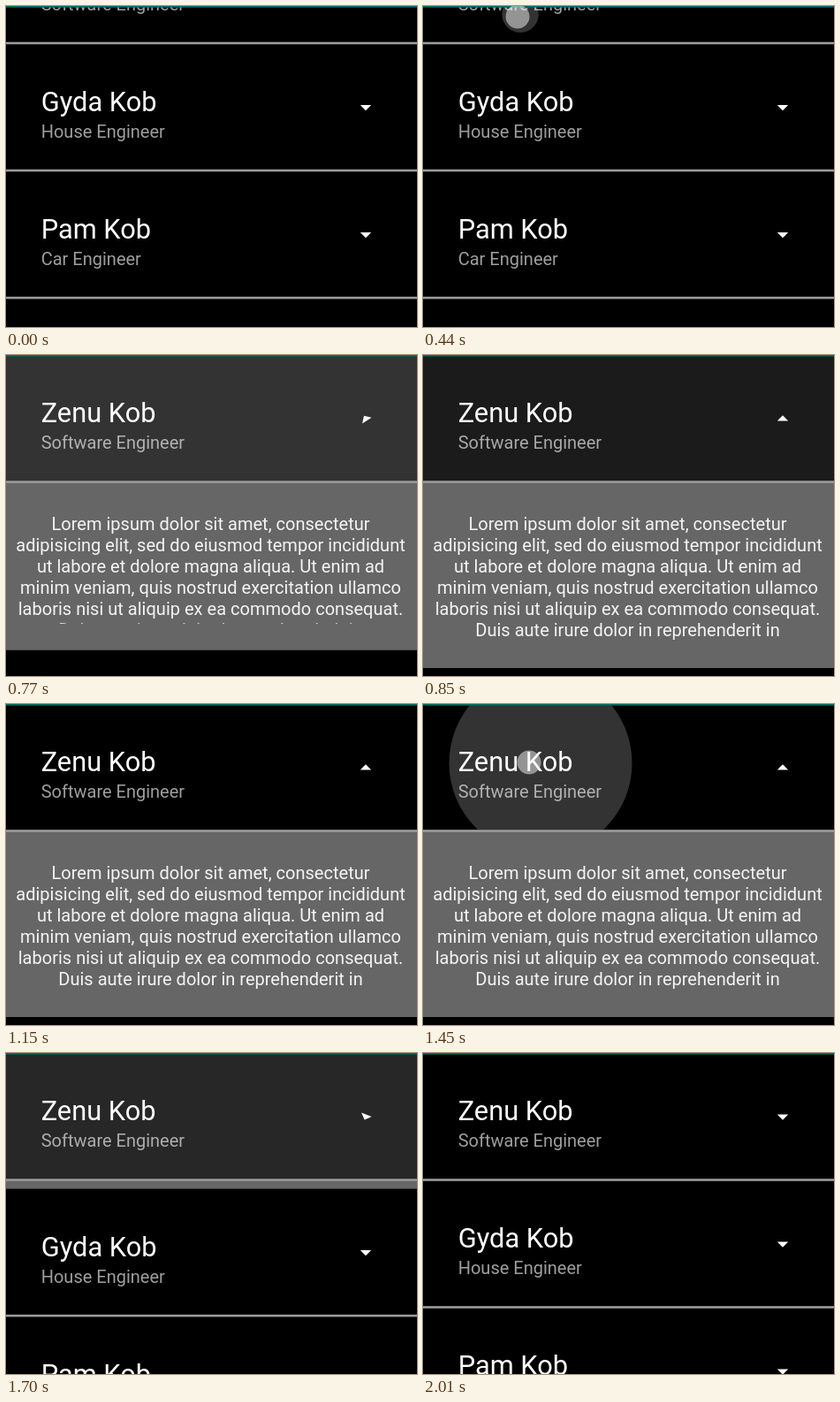
An HTML page with a canvas that plays this animation: 465 px wide and 363 px high, repeating every 2.16 s.

```html
<!DOCTYPE html>
<html lang="en">
<head>
<meta charset="utf-8">
<title>Expandable list</title>
<style>
  html, body { margin: 0; width: 100%; height: 100%; overflow: hidden; background: #000; }
  canvas { display: block; }
</style>
</head>
<body>
<canvas id="stage" width="465" height="363"></canvas>
<script>
const ctx = document.getElementById('stage').getContext('2d');
const WIDTH = 465, HEIGHT = 363, LOOP = 2160;
const ROW = 144, PANEL = 210, START_SCROLL = 101.5;

const TICKS = [0, 440, 530, 620, 690, 770, 850, 920,
  1320, 1400, 1470, 1550, 1630, 1700, 1780, 1860];

const PEOPLE = [
  ['Zenu Kob', 'Software Engineer'],
  ['Gyda Kob', 'House Engineer'],
  ['Pam Kob', 'Car Engineer'],
];
const BODY = [
  'Lorem ipsum dolor sit amet, consectetur',
  'adipisicing elit, sed do eiusmod tempor incididunt',
  'ut labore et dolore magna aliqua. Ut enim ad',
  'minim veniam, quis nostrud exercitation ullamco',
  'laboris nisi ut aliquip ex ea commodo consequat.',
  'Duis aute irure dolor in reprehenderit in',
];
// Touch points; row y is relative to the first row, screen y to the stage.
const TAPS = [
  { start: 420, x: 107, screenY: 12, rowY: 113, driftX: 35, driftY: -24 },
  { start: 1300, x: 120, screenY: 66, rowY: 66, driftX: 30, driftY: 2 },
];

const progress = (t, start, duration) => Math.min(1, Math.max(0, (t - start) / duration));
const easeInOut = u => 0.5 - 0.5 * Math.cos(Math.PI * u);
const easeOut = u => 1 - (1 - u) ** 2;
const white = alpha => `rgba(255,255,255,${alpha})`;

function rect(x, y, w, h, color) {
  ctx.fillStyle = color;
  ctx.fillRect(x, y, w, h);
}

function disc(x, y, r, color) {
  ctx.fillStyle = color;
  ctx.beginPath();
  ctx.arc(x, y, r, 0, 2 * Math.PI);
  ctx.fill();
}

function text(string, x, y, size, color, align = 'left') {
  ctx.font = `${size}px Roboto, sans-serif`;
  ctx.textAlign = align;
  ctx.fillStyle = color;
  ctx.fillText(string, x, y);
}

function clipped(x, y, w, h, draw) {
  ctx.save();
  ctx.beginPath();
  ctx.rect(x, y, w, h);
  ctx.clip();
  draw();
  ctx.restore();
}

function caret(x, y, turn) {
  ctx.save();
  ctx.translate(x, y);
  ctx.rotate(turn * Math.PI);
  ctx.fillStyle = '#fff';
  ctx.beginPath();
  ctx.moveTo(-6.2, -2.5);
  ctx.lineTo(6.2, -2.5);
  ctx.lineTo(0, 3.7);
  ctx.fill();
  ctx.restore();
}

function ripple(tap, t, top) {
  const age = t - tap.start;
  const alpha = 0.2 * (1 - progress(age, 370, 130));
  if (age <= 0 || alpha === 0) return;
  const drift = progress(age, 0, 230);
  clipped(0, top, WIDTH, ROW - 2, () =>
    disc(tap.x + tap.driftX * drift, top + tap.rowY + tap.driftY * drift, age * 1.035, white(alpha)));
}

function touch(tap, t) {
  const age = t - tap.start;
  const alpha = 0.48 * (1 - progress(age, 200, 85));
  if (age > 0 && alpha > 0) disc(tap.x, tap.screenY, 13.5, white(alpha));
}

function row([name, job], top, turn) {
  text(name, 39.7, top + 76, 30.8, '#fff');
  text(job, 39.7, top + 106, 20, white(0.62));
  caret(407, top + 72, turn);
  rect(0, top + 142.2, WIDTH, 2.6, '#9d9b9b');
}

function panel(top, height) {
  if (height <= 0) return;
  rect(0, top, WIDTH, height, '#666');
  clipped(0, top, WIDTH, Math.max(0, height - 30), () =>
    BODY.forEach((line, i) =>
      text(line, 231.5, top + 53.5 + 24 * i, 20.05, '#f4f4f4', 'center')));
}

function draw(t) {
  const top = -START_SCROLL * (1 - easeOut(progress(t, 540, 180)));
  const open = easeInOut(progress(t, 607, 204)) - easeInOut(progress(t, 1505, 226));
  const turn = easeInOut(progress(t, 600, 235)) - easeInOut(progress(t, 1503, 253));
  const height = PANEL * open;

  rect(0, 0, WIDTH, HEIGHT, '#000');
  TAPS.forEach(tap => ripple(tap, t, top));
  panel(top + ROW, height);
  PEOPLE.forEach((person, i) =>
    row(person, top + ROW * i + (i ? height : 0), i ? 0 : turn));
  rect(0, 0, WIDTH, 1.7, '#006e60');
  TAPS.forEach(tap => touch(tap, t));
}

function frame() {
  const now = performance.now() % LOOP;
  draw(TICKS.findLast(tick => tick <= now));
  requestAnimationFrame(frame);
}
frame();
</script>
</body>
</html>
```
